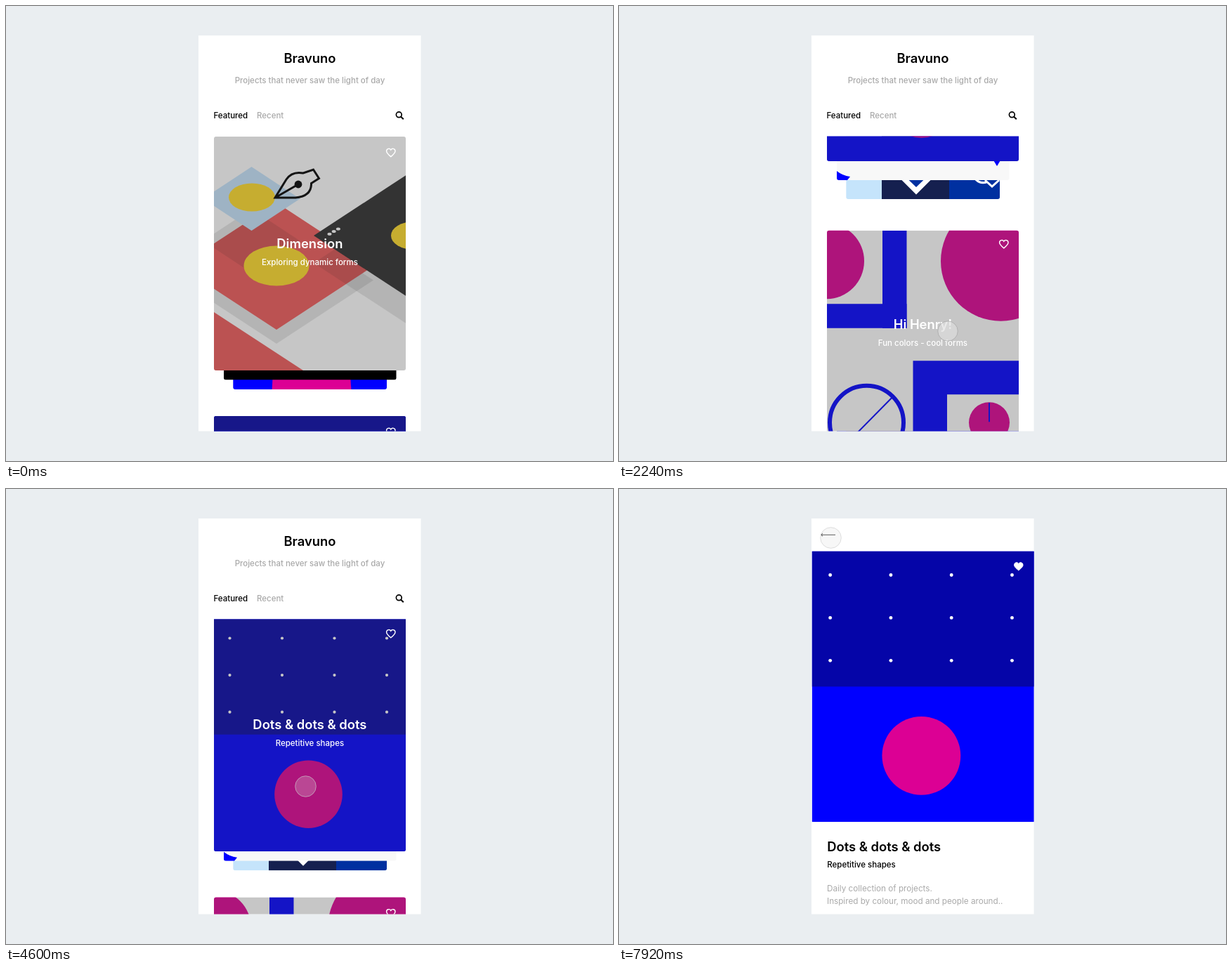
An HTML page for the animation above (8000 ms loop, 864 by 648 pixels).

```html
<!DOCTYPE html>
<html lang="en">
<head>
<meta charset="utf-8">
<title>Project gallery</title>
<style>
  html, body { margin: 0; width: 100%; height: 100%; overflow: hidden; background: #eaeef1; }
  svg { display: block; width: 864px; height: 648px; font-family: Inter, "Open Sans", sans-serif; }
  .title { font-size: 18.4px; font-weight: 600; }
  .sub { font-size: 11.5px; font-weight: 500; }
  .mid { text-anchor: middle; }
  .grey { fill: #a9a9a9; }
</style>
</head>
<body>
<svg id="stage" viewBox="0 0 864 648"></svg>
<script>
const LOOP = 8000, STEP = 40;
const CARD_W = 273, CARD_H = 333, LEFT = 296, TOP = 186, PITCH = 398;
const BLUE = '#00f', PINK = '#dc0094', YELLOW = '#ffdb28', SKY = '#c5e4fb', RED = '#ef5959';

// ---- shape helpers
const rect = (x, y, w, h, fill, extra = '') =>
  `<rect x="${x}" y="${y}" width="${w}" height="${h}" fill="${fill}" ${extra}/>`;
const ellipse = (x, y, rx, ry, fill) => `<ellipse cx="${x}" cy="${y}" rx="${rx}" ry="${ry}" fill="${fill}"/>`;
const disc = (x, y, r, fill) => ellipse(x, y, r, r, fill);
const path = (d, fill, extra = '') => `<path d="${d}" fill="${fill}" ${extra}/>`;
const stroke = (d, color, width) => path(d, 'none', `stroke="${color}" stroke-width="${width}"`);
const diamond = (x, y, hw, hh, fill, extra) =>
  path(`M${x - hw} ${y}L${x} ${y - hh}L${x + hw} ${y}L${x} ${y + hh}Z`, fill, extra);
const shadow = (x, y, hw, hh) => diamond(x, y, hw, hh, '#000', 'opacity=".1"');
const HEART = 'M0 5.6C-4.4 1.9-6.2 .2-6.2-2.3A3.3 3.3 0 0 1 0-4A3.3 3.3 0 0 1 6.2-2.3C6.2 .2 4.4 1.9 0 5.6Z';

// ---- artwork, in card coordinates
function isometricArt() {
  return rect(0, 0, CARD_W, CARD_H, '#fff') +
    shadow(89, 204.5, 138, 90.5) +
    diamond(89, 184.5, 138, 90.5, RED) +
    shadow(53.5, 148.5, 69, 45.5) +
    shadow(342, 180, 200, 131) +
    ellipse(89, 184, 46.5, 28.5, YELLOW) +
    diamond(342, 141, 200, 131, '#2c2c2c') +
    ellipse(285, 141, 33, 20, YELLOW) +
    diamond(53.5, 88.5, 69, 45.5, SKY) +
    ellipse(54, 86.5, 33, 20, YELLOW) +
    path('M0 250L127 333H0Z', RED) +
    [0, 1, 2].map(i => ellipse(164.5 + i * 6.2, 138.7 - i * 3.6, 3, 2, '#fff')).join('') +
    stroke('M87 87L103 61Q111 49 127 52L141.5 47L149.5 59.5L138.5 66.5Q139 85 116 87ZL120 68', '#000', 3) +
    disc(120, 68, 5.4, '#000');
}
function dotsArt() {
  let s = rect(0, 0, CARD_W, CARD_H, BLUE) + rect(0, 0, CARD_W, 166.5, '#0505a8');
  for (let i = 0; i < 12; i++)
    s += disc(22.5 + i % 4 * 74.5, 29.3 + Math.floor(i / 4) * 52.6, 2.1, '#fff');
  return s + disc(134.5, 251.5, 48.3, PINK);
}
function formsArt() {
  return rect(0, 0, CARD_W, CARD_H, '#fff') +
    disc(-1, 43.5, 54, PINK) + disc(247.5, 43.5, 85.5, PINK) +
    rect(79, 0, 34.5, 139, BLUE) + rect(0, 104.5, 113.5, 34.5, BLUE) +
    `<circle cx="56.5" cy="273.5" r="52.5" fill="none" stroke="${BLUE}" stroke-width="6"/>` +
    stroke('M21 310.5L93 237.5', BLUE, 2) +
    rect(122.5, 185.5, 151, 148, BLUE) + rect(171, 233.5, 103, 80.5, '#fff') +
    disc(231, 273.5, 29, PINK) + stroke('M231 245.5V272.5', BLUE, 2);
}

// ---- stacked sheets behind a card; y = 0 is the bottom edge
const sheet = fill => rect(0, -100, CARD_W, 100, fill);
const cards = [
  { title: 'Dimension', sub: 'Exploring dynamic forms', art: isometricArt(),
    back: [sheet('#000'), sheet(BLUE) + path('M84-60Q84-14 82.5 0H195.5Q194-14 193-60Z', PINK)] },
  { title: 'Dots &amp; dots &amp; dots', sub: 'Repetitive shapes', art: dotsArt(),
    back: [
      sheet('#f8f8f8') + path('M14-13Q22-6.5 33-5L29 0H14Z', BLUE) + path('M234-33L242-20L250-33Z', BLUE),
      sheet(SKY) + rect(78, -100, 96, 100, '#15204f') + rect(174, -100, 80, 100, '#0030a0') +
        path('M87-46.5L127-6.5L167-46.5Z', '#fff') + path('M97-46L127-17L157-46Z', '#0030a0') +
        stroke('M225-27L235-18L245-27M211-29Q217-21.5 227-24', '#fff', 3)
    ] },
  { title: 'Hi Henry!', sub: 'Fun colors - cool forms', art: formsArt(),
    back: [sheet(BLUE), sheet(YELLOW)] }
];

const text = (x, y, cls, body, extra = '') => `<text x="${x}" y="${y}" class="${cls}" ${extra}>${body}</text>`;
const cardMarkup = (c, i) => `
  <g id="card${i}">
    <g id="low${i}"><g clip-path="url(#lowClip)">${c.back[1]}</g></g>
    <g id="high${i}"><g clip-path="url(#highClip)">${c.back[0]}</g></g>
    <g id="art${i}"><g clip-path="url(#cardClip)">${c.art}
      ${rect(0, 0, CARD_W, CARD_H, '#424242', `id="shade${i}" opacity=".3"`)}</g></g>
    <g id="title${i}" fill="#fff">${text(0, 6.3, 'title mid', c.title)}</g>
    <g id="sub${i}" fill="#fff">${text(0, 4, 'sub mid', c.sub)}</g>
    <path id="heart${i}" d="${HEART}" fill="none" stroke="#fff" stroke-width="1.4"/>
  </g>`;

document.getElementById('stage').innerHTML = `
  <defs>
    <clipPath id="view"><rect id="viewRect" x="274" width="317"/></clipPath>
    <clipPath id="cardClip"><rect id="cardRect" width="${CARD_W}" height="${CARD_H}"/></clipPath>
    <clipPath id="highClip"><rect x="14" y="-100" width="245.5" height="100" rx="3"/></clipPath>
    <clipPath id="lowClip"><rect x="27.3" y="-100" width="218.7" height="100" rx="3"/></clipPath>
  </defs>
  ${rect(0, 0, 864, 648, '#eaeef1')}
  ${rect(274, 42, 316.5, 563.5, '#fff')}
  <g id="header">
    ${text(432.5, 81, 'title mid', 'Bravuno')}
    ${text(432.5, 110, 'sub mid grey', 'Projects that never saw the light of day')}
    ${text(295.5, 160, 'sub', 'Featured')}
    ${text(357, 160, 'sub grey', 'Recent')}
    <circle cx="559.3" cy="154.8" r="3.9" fill="none" stroke="#000" stroke-width="1.7"/>
    ${stroke('M562.2 157.8L565.8 161.3', '#000', 2)}
  </g>
  <g clip-path="url(#view)">${[0, 2, 1].map(i => cardMarkup(cards[i], i)).join('')}</g>
  <g id="detail">
    ${stroke('M308 65.3H287.5M290 63.3L287.5 65.3L290 67.3', '#333', 1)}
    <g font-size="11.7" class="grey">
      ${text(296, 573, '', 'Daily collection of projects.')}
      ${text(296, 591, '', 'Inspired by colour, mood and people around..')}
    </g>
  </g>
  <circle id="cursor"/>`;

const el = {};
document.querySelectorAll('[id]').forEach(n => el[n.id] = n);
const set = (id, attrs) => { for (const k in attrs) el[id].setAttribute(k, attrs[k]); };
const move = (id, x, y, scale = 1) => set(id, { transform: `translate(${x} ${y}) scale(${scale})` });
const mix = (a, b, p) => a + (b - a) * p;
const clamp = (v, lo, hi) => Math.min(hi, Math.max(lo, v));

// Smooth monotone curve through [position, value] points
function track(...pts) {
  const last = pts.length - 1;
  const slope = i => (pts[i + 1][1] - pts[i][1]) / (pts[i + 1][0] - pts[i][0]);
  const tangent = pts.map((_, i) => {
    if (i === 0 || i === last) return 0;
    const a = slope(i - 1), b = slope(i);
    return a * b <= 0 ? 0 : 2 * a * b / (a + b);
  });
  return x => {
    if (x <= pts[0][0]) return pts[0][1];
    if (x >= pts[last][0]) return pts[last][1];
    let i = 0;
    while (x >= pts[i + 1][0]) i++;
    const w = pts[i + 1][0] - pts[i][0], u = (x - pts[i][0]) / w, v = 1 - u;
    return pts[i][1] * v * v * (1 + 2 * u) + pts[i + 1][1] * u * u * (3 - 2 * u) +
      w * u * v * (tangent[i] * v - tangent[i + 1] * u);
  };
}

// ---- motion
const middleTop = track([440, 584], [800, 424], [1200, 253], [1540, 192], [1720, 186], [1780, 186],
  [2240, -112], [2880, -182.5], [3300, -212], [3460, -212], [3920, 13], [4360, 168], [4740, 186]);
const spread = [
  track([440, 0], [1200, 27]),
  track([1780, 0], [2240, 13.5], [2880, 4.8], [3400, 3], [3920, 9.5], [4640, 0]),
  track([2400, 0], [2880, 1.2], [3250, 0])
];
const captionOffset = track([13, 184.5], [186, 179], [238, 160.5]);
const cursorX = track([80, 880], [440, 470], [1300, 470], [2240, 468], [2880, 465], [3200, 462],
  [3500, 430], [3920, 428], [4600, 426.5], [5240, 426.5], [5640, 431], [6020, 514], [6500, 566],
  [6900, 567], [7660, 309], [7740, 309], [7920, 301.5]);
const cursorY = track([80, -16], [440, 560], [1200, 420], [1320, 415], [1740, 570], [2240, 463],
  [2880, 411], [3180, 405], [3480, 300], [3920, 369], [4600, 423.5], [5240, 423.5], [5640, 419],
  [6020, 215], [6500, 112], [6900, 111.5], [7660, 74], [7740, 74], [7920, 69.5]);
const presses = [[480, 1040], [1780, 3040], [3480, 4600], [4920, 5200], [6640, 6800]];

function openness(t) {
  const u = Math.max(0, t - 5160) * 0.016;
  return u > 13 ? 1 : 1 - (1 + u) * Math.exp(-u);
}

function drawCard(i, top, e, p) {
  const hero = i === 1 ? p : 0;
  const bottom = top + CARD_H, gap = 13.5 + e;
  const subY = top + captionOffset(top);
  const fade = 1 - clamp(p * 2, 0, 1);
  move('art' + i, mix(LEFT, 274.6, hero), mix(top, 88.6, hero), mix(1, 1.158, hero));
  move('high' + i, LEFT, bottom + gap);
  move('low' + i, LEFT, bottom + 2 * gap);
  move('title' + i, mix(432.4, 377.2, hero), mix(subY - 26.7, 509.2, hero));
  move('sub' + i, mix(432.4, 345, hero), mix(subY, 534.5, hero));
  const lift = i === 2 ? clamp((spread[1].now - 5) * 0.8, 0, 3.5) : 0;
  move('heart' + i, mix(547.8, 568.8, hero), mix(top + 23 - lift, 110.4, hero));
  if (i === 1) {
    const tone = Math.round(255 * (1 - p));
    const fill = `rgb(${tone},${tone},${tone})`;
    set('title1', { fill });
    set('sub1', { fill });
    set('shade1', { opacity: 0.3 * (1 - p) });
    set('high1', { opacity: fade });
    set('low1', { opacity: fade });
  } else {
    set('card' + i, { opacity: i === 0 && p > 0 ? 0 : fade });
  }
}

function render(t) {
  const p = openness(t), c = middleTop(t);
  const e = spread.map(f => f.now = f(t));
  const viewTop = p > 0 ? 42 : TOP - 0.5;
  set('viewRect', { y: viewTop, height: 605.5 - viewTop });
  set('cardRect', { rx: 3 * (1 - p) });
  drawCard(0, c - PITCH - 2.5 * e[0], e[0], p);
  drawCard(1, c, e[1], p);
  drawCard(2, c + PITCH + 2.5 * e[1], e[2], p);
  set('header', { opacity: 1 - clamp(p * 2, 0, 1) });
  set('detail', { opacity: clamp(p * 2 - 1, 0, 1) });
  set('heart1', { fill: t >= 6720 ? '#fff' : 'none', 'stroke-width': mix(1.4, 1, p) });

  const down = presses.some(([a, b]) => t >= a && t < b);
  set('cursor', {
    cx: cursorX(t), cy: cursorY(t), r: down ? 14.2 : 14.8,
    fill: down ? 'rgba(222,222,222,.65)' : 'rgba(222,222,222,.25)',
    stroke: down ? 'rgba(160,160,160,.8)' : 'rgba(205,205,205,.8)',
    'stroke-width': 0.8,
    visibility: t < 80 ? 'hidden' : 'visible'
  });
}

const start = performance.now();
function frame() {
  const t = (performance.now() - start) % LOOP;
  render(Math.floor(t / STEP) * STEP);
  requestAnimationFrame(frame);
}
frame();
</script>
</body>
</html>
```
